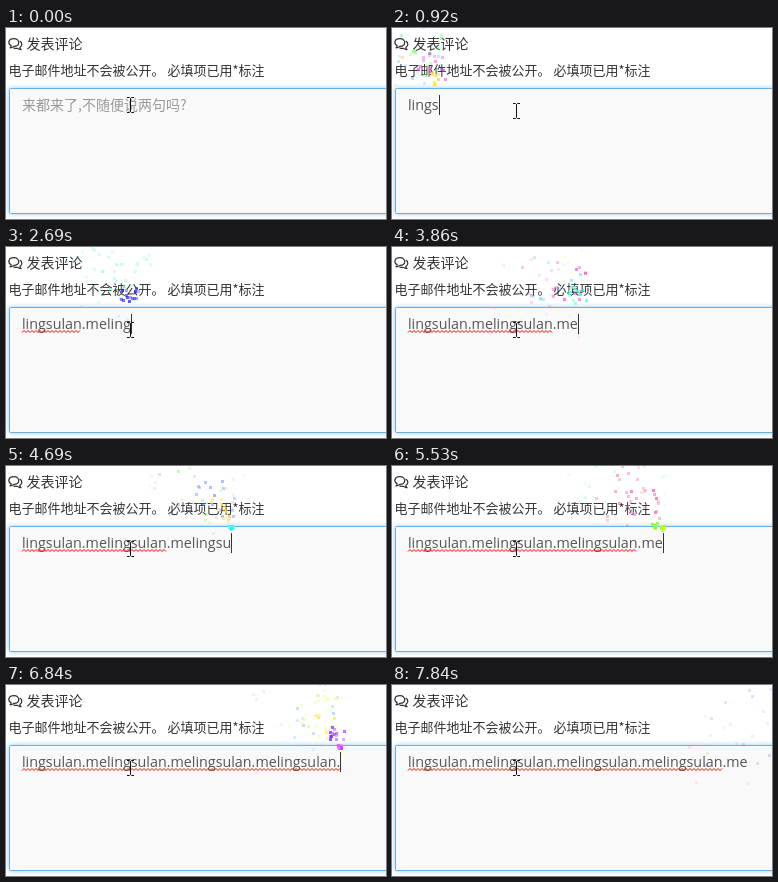
An HTML page for the animation above (7990 ms loop, 380 px wide and 191 px high).

```html
<!DOCTYPE html>
<html lang="zh">
<head>
<meta charset="utf-8">
<style>
html, body { margin: 0; width: 100%; height: 100%; overflow: hidden; background: #fff; }
svg { display: block; width: 380px; height: 191px; }
.cjk { font-family: "Noto Sans CJK SC", "Noto Sans CJK", "Noto Sans", sans-serif; }
.typed { font: 14.3px "Open Sans", "Noto Sans", sans-serif; fill: #555; }
.box { fill: #f9f9f9; stroke: #66afe9; filter: drop-shadow(0 0 2.5px rgba(102, 175, 233, .65)); }
</style>
</head>
<body>
<svg viewBox="0 0 380 191" xmlns="http://www.w3.org/2000/svg">
  <rect width="380" height="191" fill="#fff"/>
  <g fill="none" stroke="#333" stroke-width="1.3" stroke-linejoin="round" transform="translate(-.3 .3) scale(.96)">
    <path d="M5.6 18.1C1.9 16.3 2.6 10.8 8.6 10.8C15.2 10.8 15.3 18.8 8.4 18.8C7.2 19.9 5.8 20.3 4.6 20.3Q5.8 19.3 5.6 18.1Z"/>
    <path d="M14.6 13.2C17.7 14.8 17.3 18.6 14.8 19.9Q14.8 21.2 16 22.2Q13.6 22.2 12.3 20.9Q9.8 21.3 8 20.2"/>
  </g>
  <g class="cjk" fill="#333">
    <text x="20.5" y="21" font-size="14">发表评论</text>
    <text x="2.5" y="47" font-size="13">电子邮件地址不会被公开。 必填项已用*标注</text>
  </g>
  <rect class="box" x="3.5" y="60.5" width="400" height="125" rx="1"/>
  <text id="hint" class="cjk" x="16" y="82" font-size="14" fill="#999">来都来了,不随便说两句吗?</text>
  <text id="typed" class="typed" x="16" y="82"></text>
  <path id="wave" fill="none" stroke="#f00" stroke-width="1"/>
  <rect id="caret" y="67" width="1" height="20" fill="#333"/>
  <path id="mouse" fill="none" stroke="#111" d="M121 .5h2.5l1 1l1 -1h2.5M124.5 1.5v13M121 15.5h2.5l1 -1l1 1h2.5"/>
  <g id="sparks" shape-rendering="crispEdges"></g>
</svg>
<script>
const LOOP = 7990, START = 300, TICK = 76.92, STEP = 1000 / 60;
const LEFT = 16, EMIT_Y = 67, WORD = 'lingsulan', UNIT = WORD + '.me';
const FULL = UNIT.repeat(4);

// [characters typed, time in ms]
const pace = [[1, 300], [11, 1540], [16, 2540], [24, 3700], [34, 5290],
  [35, 5485], [36, 5500], [42, 6270], [44, 6620], [46, 6805], [48, 7060]];

// base hue of the burst for each key
const hues = [30, 200, 120, 290, 50, 180, 350, 300, 325, 300, 240, 20,
  190, 150, 160, 245, 100, 40, 300, 60, 330, 200, 310, 165,
  20, 270, 110, 220, 50, 180, 145, 350, 330, 335, 92, 80,
  10, 240, 130, 210, 60, 210, 75, 55, 268, 288, 325, 250];

const el = id => document.getElementById(id);
const [hint, typed, wave, caret, mouse, sparks] =
  ['hint', 'typed', 'wave', 'caret', 'mouse', 'sparks'].map(el);

function keyTime(n) {
  const i = Math.max(1, pace.findIndex(p => p[0] >= n));
  const [n0, t0] = pace[i - 1], [n1, t1] = pace[i];
  return t0 + (t1 - t0) * (n - n0) / (n1 - n0);
}

function random(seed) {
  let s = seed * 7919 + 17;
  return (a, b) => {
    s = (s + 0x6D2B79F5) | 0;
    let r = Math.imul(s ^ (s >>> 15), 1 | s);
    r = (r + Math.imul(r ^ (r >>> 7), 61 | r)) ^ r;
    return a + (b - a) * ((r ^ (r >>> 14)) >>> 0) / 4294967296;
  };
}

const keys = hues.map((hue, i) => {
  const rnd = random(i + 1);
  const bits = Array.from({ length: 9 + Math.round(rnd(0, 6)) }, () => ({
    vx: rnd(-1, 1),
    vy: rnd(-3.5, -1.5),
    color: `hsl(${Math.round(hue + rnd(-10, 10) + 360) % 360},100%,${Math.round(rnd(50, 80))}%)`
  }));
  return { time: keyTime(i + 1), bits };
});

// caret offset after each character
typed.textContent = FULL;
const widths = [0];
for (let n = 1; n <= FULL.length; n++) widths.push(typed.getSubStringLength(0, n));

function burst(key, n, t) {
  const age = Math.floor((t - key.time) / STEP) + 1;
  const alpha = Math.pow(0.96, age);
  if (age < 1 || alpha <= 0.1) return '';
  return key.bits.map(b => {
    const x = Math.round(LEFT + widths[n] + b.vx * age - 1.5);
    const y = Math.round(EMIT_Y + b.vy * age + 0.0375 * age * (age + 1) - 1.5);
    return `<rect x="${x}" y="${y}" width="3" height="3" fill="${b.color}" opacity="${alpha.toFixed(3)}"/>`;
  }).join('');
}

// underline up to the last finished word, with its dot while that is the last key
function squiggle(count) {
  const words = Math.floor((count + 2) / UNIT.length);
  if (!words) return '';
  const dot = (words - 1) * UNIT.length + WORD.length + 1;
  const width = widths[count === dot ? dot : dot - 1];
  let d = `M${LEFT} 85.5`;
  for (let x = 2, up = true; x <= width; x += 2, up = !up) d += `L${LEFT + x} ${up ? 83.5 : 85.5}`;
  return d;
}

// the picture advances in even ticks, with one longer hold
function snap(t) {
  if (t < START) return t;
  let k = Math.min(98, Math.floor((t - START + 2) / TICK));
  if (k === 67) k = 66;
  return START + k * TICK;
}

function draw(now) {
  const t = snap(now % LOOP);
  const count = keys.filter(k => k.time <= t).length;
  const last = count ? keys[count - 1].time : 150;

  hint.style.display = count ? 'none' : '';
  typed.textContent = FULL.slice(0, count);
  wave.setAttribute('d', squiggle(count));
  caret.setAttribute('x', Math.round(LEFT + widths[count]));
  caret.style.display = t >= 150 && (t - last) % 1060 < 530 ? '' : 'none';
  mouse.setAttribute('transform', `translate(0 ${t < 377 ? 69 : 75})`);
  sparks.innerHTML = keys.map((k, i) => burst(k, i + 1, t)).join('');
}

const begin = performance.now();
function loop() {
  draw(performance.now() - begin);
  requestAnimationFrame(loop);
}
loop();
</script>
</body>
</html>
```
